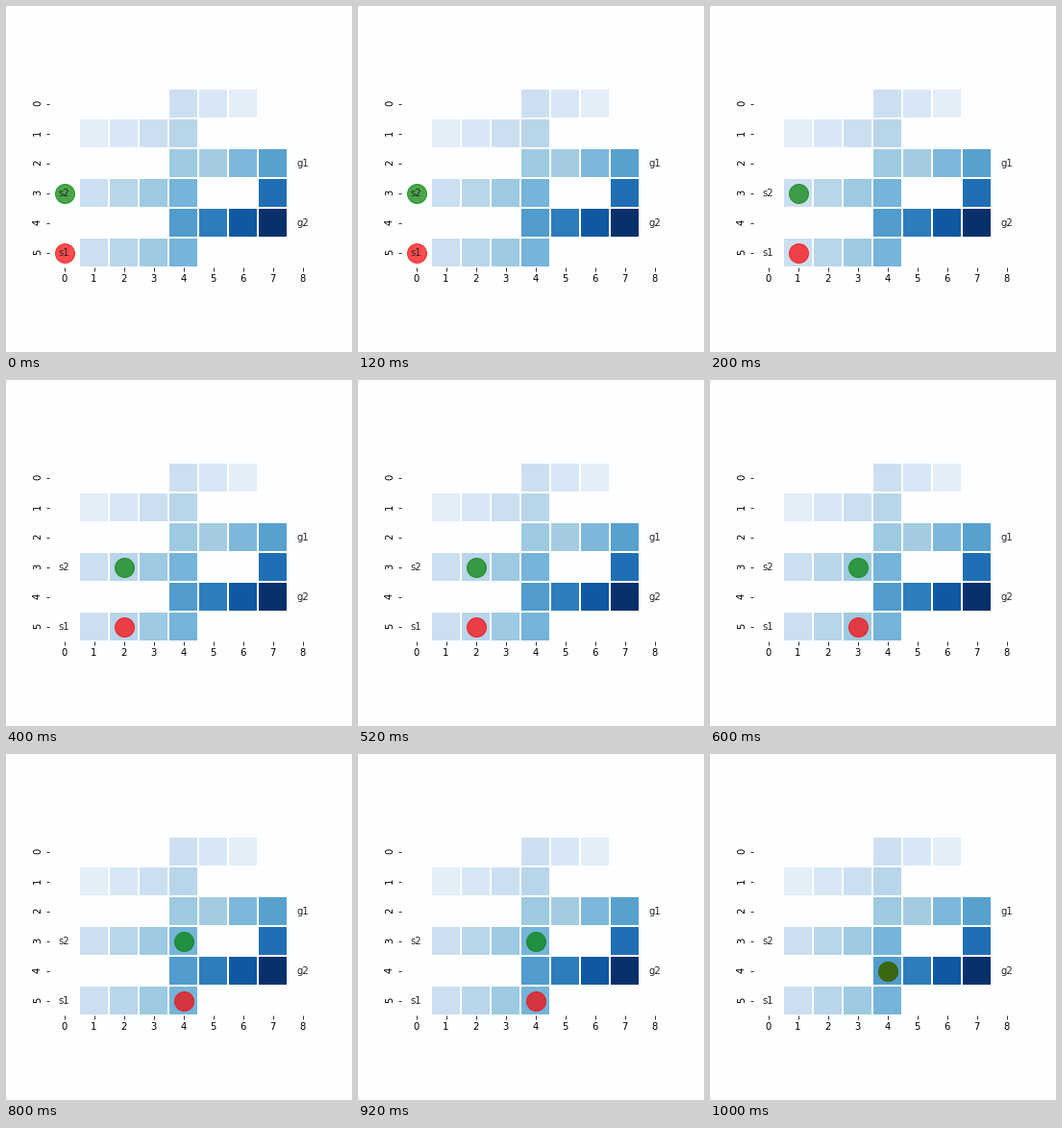
A matplotlib script for the animation above (1.2 s loop, 360 by 360 pixels).

```python
import numpy as np
import matplotlib.pyplot as plt
from matplotlib.animation import FuncAnimation

SIZE, DPI = 360, 72
CELL, LEFT, TOP = 31, 45, 86.3
STEPS, INTERVAL = 6, 200
DECAY, FLOOR = .88, .24
BACKGROUND = "#fcfeff"

MAZE = """
....###..
.####....
....####.
.####..#.
....####.
.####....
""".split()
ROWS, COLS = len(MAZE), len(MAZE[0])
GOAL = (4, 7)
JUNCTION = (4, 4)
LABELS = {"s1": (5, 0), "s2": (3, 0), "g1": (2, 8), "g2": (4, 8)}

plt.rcParams["font.family"] = "DejaVu Sans"
plt.rcParams["font.size"] = 10


def step_cost(cell, other):
    """The right-hand passage is slower to climb than the rest."""
    climbs = cell[0] != other[0]
    return 1.6 if climbs and cell[1] == GOAL[1] else 1


def distances():
    """Cheapest walk from the goal to every open cell."""
    reached, queue = {GOAL: 0}, [GOAL]
    while queue:
        cell = queue.pop(0)
        row, col = cell
        for other in ((row - 1, col), (row + 1, col), (row, col - 1), (row, col + 1)):
            r, c = other
            if not (0 <= r < ROWS and 0 <= c < COLS) or MAZE[r][c] == ".":
                continue
            cost = reached[cell] + step_cost(cell, other)
            if cost < reached.get(other, np.inf):
                reached[other] = cost
                queue.append(other)
    return reached


def value_grid():
    """Values fade exponentially with the distance from the goal."""
    grid = np.full((ROWS, COLS), np.nan)
    for cell, distance in distances().items():
        grid[cell] = (DECAY ** distance - FLOOR) / (1 - FLOOR)
    return np.ma.masked_invalid(grid)


def agent_cell(start, step):
    """Walk right to the junction column, then turn into the junction."""
    row, col = start[0], start[1] + step
    return (row, col) if col <= JUNCTION[1] else JUNCTION


def center(cell):
    return cell[1] + .5, cell[0] + .5


fig = plt.figure(figsize=(SIZE / DPI, SIZE / DPI), dpi=DPI, facecolor=BACKGROUND)
width, height = COLS * CELL, ROWS * CELL
ax = fig.add_axes([LEFT / SIZE, 1 - (TOP + height) / SIZE,
                   width / SIZE, height / SIZE], facecolor=BACKGROUND)
ax.pcolormesh(value_grid(), cmap="Blues", vmin=0, vmax=1,
              edgecolors="white", linewidth=2)
ax.set(xlim=(0, COLS), ylim=(ROWS, 0))
ax.set_xticks(np.arange(COLS) + .5, range(COLS))
ax.set_yticks(np.arange(ROWS) + .5, range(ROWS), rotation=90)
ax.spines[:].set_visible(False)

for name, cell in LABELS.items():
    ax.text(*center(cell), name, color=".15", ha="center", va="center")

agents = [(ax.plot([], [], "o", color=color, markersize=20, alpha=.7)[0], LABELS[name])
          for name, color in (("s1", "red"), ("s2", "green"))]


def update(step):
    for dot, start in agents:
        x, y = center(agent_cell(start, step))
        dot.set_data([x], [y])
    return [dot for dot, _ in agents]


anim = FuncAnimation(fig, update, frames=STEPS, interval=INTERVAL,
                     repeat=True, repeat_delay=0, blit=False)
plt.show()
```
